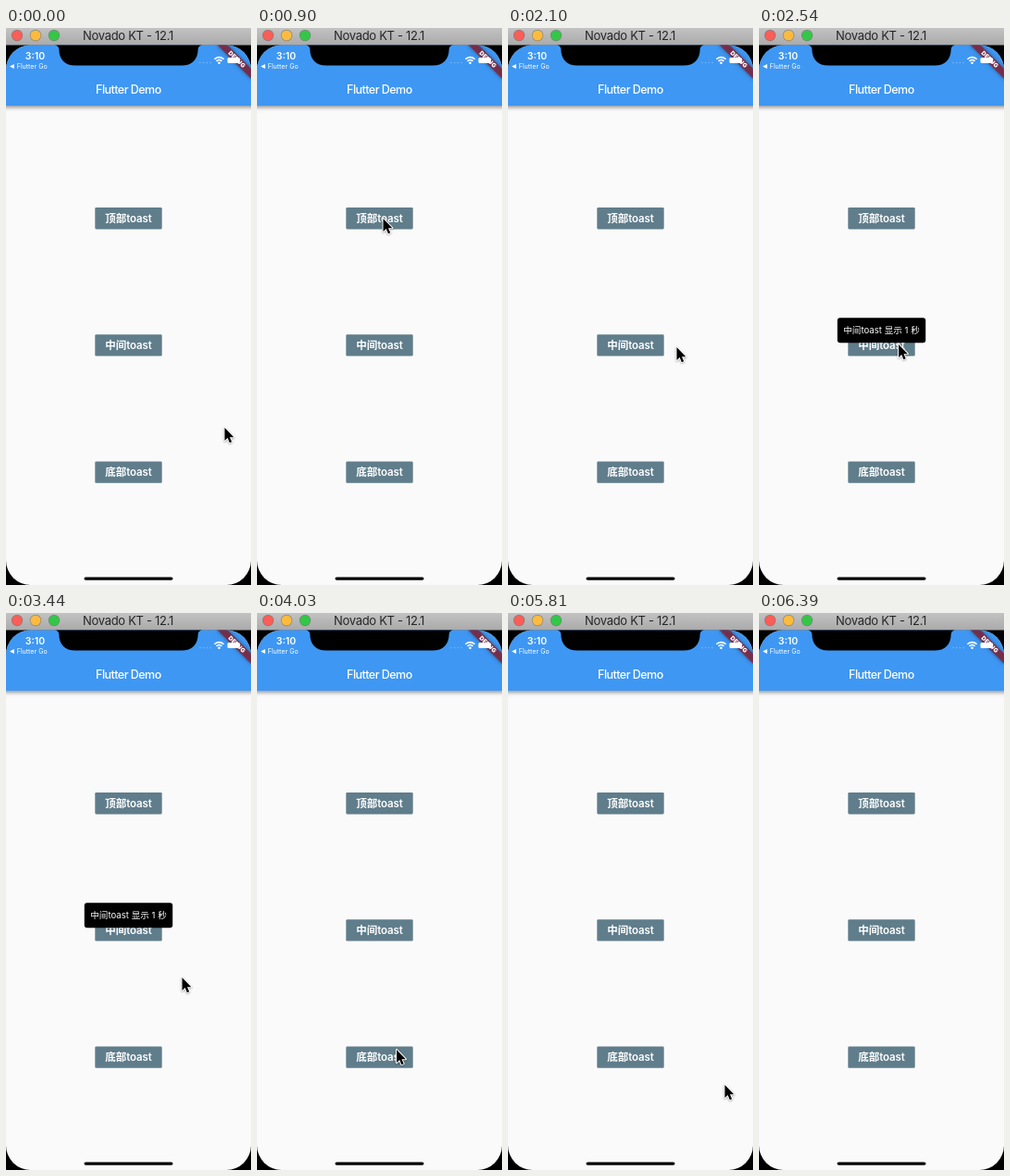
Animation, 265 px wide and 602 px high, one loop 6.49 s. Source, as an HTML page with a canvas:

```html
<!DOCTYPE html>
<html lang="zh-CN">
<head>
<meta charset="utf-8">
<title>Toast demo</title>
<style>
  html, body { margin: 0; width: 100%; height: 100%; overflow: hidden; background: #000; }
  canvas { display: block; width: 265px; height: 602px; }
</style>
</head>
<body>
<canvas id="stage"></canvas>
<script>
const W = 265, H = 602, MID = 132.5;
const LOOP = 6490, STEP = 148.6;
const FONT = 'Inter, "Noto Sans CJK SC", "Noto Sans CJK JP", "Noto Sans CJK", sans-serif';
const BLUE = '#3e97f3';
const canvas = document.getElementById('stage');
const ctx = canvas.getContext('2d');
const dpr = window.devicePixelRatio || 1;
canvas.width = W * dpr;
canvas.height = H * dpr;

const ITEMS = [
  { name: '顶部toast', secs: 0.5, at: 1130, toastY: 167.3 },
  { name: '中间toast', secs: 1, at: 2510, toastY: 313.2 },
  { name: '底部toast', secs: 1.5, at: 4250, toastY: 459 }
];

// Pointer: rest position, then eased moves between two steps
const REST = { x: 236.5, y: 432 };
const MOVES = [
  { from: 2, to: 6, x: 136.5, y: 206 },
  { from: 7, to: 9, x: 242.5, y: 380 },
  { from: 12, to: 14, x: 182.5, y: 345 },
  { from: 14, to: 16, x: 151, y: 342 },
  { from: 17, to: 19, x: 199, y: 379 },
  { from: 22, to: 23, x: 190.5, y: 394 },
  { from: 23, to: 25, x: 151, y: 472 },
  { from: 28, to: 30, x: 234.5, y: 510 },
  { from: 40, to: 43, x: 256, y: 620 }
];

const ease = p => p * p * (3 - 2 * p);

function pointerAt(step) {
  let { x, y } = REST;
  for (const m of MOVES) {
    const p = Math.min(1, Math.max(0, (step - m.from) / (m.to - m.from)));
    x += (m.x - x) * ease(p);
    y += (m.y - y) * ease(p);
  }
  return { x, y };
}

function box(x, y, w, h, r, fill) {
  ctx.fillStyle = fill;
  ctx.beginPath();
  ctx.roundRect(x, y, w, h, r);
  ctx.fill();
}

function dot(x, y, r, fill) {
  ctx.fillStyle = fill;
  ctx.beginPath();
  ctx.arc(x, y, r, 0, Math.PI * 2);
  ctx.fill();
}

function setFont(size, weight = 400, gap = 0) {
  ctx.font = `${weight} ${size}px ${FONT}`;
  ctx.letterSpacing = gap + 'px';
}

function text(str, x, y, size, { weight, fill = '#fff', align = 'center', gap } = {}) {
  setFont(size, weight, gap);
  ctx.textAlign = align;
  ctx.fillStyle = fill;
  ctx.fillText(str, x, y);
}

function shadow(color, blur, dy) {
  ctx.shadowColor = color;
  ctx.shadowBlur = blur * dpr;
  ctx.shadowOffsetY = dy * dpr;
}

function drawTitleBar() {
  const g = ctx.createLinearGradient(0, 0, 0, 18.5);
  g.addColorStop(0, '#c2c2c2');
  g.addColorStop(1, '#aaa');
  ctx.fillStyle = g;
  ctx.fillRect(0, 0, W, 18.5);
  ['#fb5d57', '#fcbb3f', '#33c748'].forEach((c, i) => {
    dot(12 + i * 20, 8, 6.2, 'rgba(0,0,0,.3)');
    dot(12 + i * 20, 8, 5.6, c);
  });
  text('Novado KT - 12.1', 132, 12.7, 13, { fill: '#262626', gap: -0.3 });
}

function drawNotch() {
  ctx.fillStyle = '#000';
  ctx.beginPath();
  ctx.moveTo(53, 18.5);
  ctx.quadraticCurveTo(57, 19, 57.3, 23);
  ctx.bezierCurveTo(57.5, 34, 64, 40.6, 75, 40.6);
  ctx.lineTo(190, 40.6);
  ctx.bezierCurveTo(201, 40.6, 207.5, 34, 207.7, 23);
  ctx.quadraticCurveTo(208, 19, 212, 18.5);
  ctx.fill();
}

function drawStatus() {
  text('3:10', 31.5, 34, 10.5, { weight: 600 });
  ctx.beginPath();
  ctx.moveTo(4, 41.5);
  ctx.lineTo(8.8, 39);
  ctx.lineTo(8.8, 44);
  ctx.fill();
  text('Flutter Go', 11.7, 44, 7.1, { align: 'left' });

  for (let i = 0; i < 4; i++) dot(210 + i * 3.7, 37.5, 0.8, 'rgba(255,255,255,.3)');

  ctx.strokeStyle = '#fff';
  ctx.lineWidth = 1.6;
  for (const r of [4, 7]) {
    ctx.beginPath();
    ctx.arc(230.5, 38.6, r, -Math.PI * 0.76, -Math.PI * 0.24);
    ctx.stroke();
  }
  dot(230.5, 37.8, 1.3, '#fff');
}

function inCorner(draw) {
  ctx.save();
  ctx.translate(W, 18.5);
  ctx.rotate(Math.PI / 4);
  draw();
  ctx.restore();
}

function drawBanner() {
  inCorner(() => {
    shadow('rgba(0,0,0,.5)', 4, 0);
    ctx.fillStyle = 'rgba(130,38,62,.85)';
    ctx.fillRect(-26, 17.9, 52, 7.7);
  });
  box(239.5, 32, 13.5, 6, 1.5, '#fff');
  inCorner(() => text('DEBUG', 0, 23.9, 6.5, { weight: 900 }));
}

function drawScreen() {
  ctx.save();
  ctx.beginPath();
  ctx.roundRect(0, 18.5, W, H - 18.5, 26.6);
  ctx.clip();
  ctx.fillStyle = '#fafafa';
  ctx.fillRect(0, 18, W, H);

  ctx.save();
  shadow('rgba(0,0,0,.4)', 4, 1.8);
  ctx.fillStyle = BLUE;
  ctx.fillRect(-10, 10, W + 20, 74);
  ctx.restore();

  drawStatus();
  drawBanner();
  text('Flutter Demo', 132.4, 70.5, 12.5, { weight: 500, gap: -0.52 });

  ITEMS.forEach(({ name }, i) => {
    const y = 194 + i * 137.2;
    box(MID - 36.2, y, 72.4, 23.4, 1.3, '#607d8b');
    text(name, MID, y + 16, 11.5, { weight: 600, gap: -0.1 });
  });
  box(84.5, 593.5, 96, 3.2, 1.6, '#000');
  ctx.restore();
  drawNotch();
}

function drawToast({ name, secs, toastY }) {
  const label = `${name} 显示 ${secs} 秒`;
  setFont(9.6);
  const w = ctx.measureText(label).width + 13;
  box(MID - w / 2, toastY, w, 27, 3, '#000');
  text(label, MID, toastY + 17.2, 9.6);
}

function drawPointer({ x, y }) {
  ctx.save();
  ctx.translate(x, y);
  ctx.beginPath();
  [[0, 0], [0, 14], [3.2, 11.1], [5.4, 16.2], [7.7, 15.2], [5.5, 10.3], [9.9, 10.3]]
    .forEach(([px, py]) => ctx.lineTo(px, py));
  ctx.closePath();
  ctx.lineJoin = 'round';
  ctx.lineWidth = 2;
  ctx.strokeStyle = '#fff';
  shadow('rgba(0,0,0,.35)', 2, 0.7);
  ctx.stroke();
  ctx.shadowColor = 'transparent';
  ctx.fillStyle = '#000';
  ctx.fill();
  ctx.restore();
}

function render(time) {
  const step = Math.floor(time / STEP);
  const t = step * STEP;
  ctx.setTransform(dpr, 0, 0, dpr, 0, 0);
  ctx.fillStyle = '#000';
  ctx.fillRect(0, 0, W, H);
  drawTitleBar();
  drawScreen();
  ITEMS.filter(({ at, secs }) => t >= at && t < at + secs * 1000).forEach(drawToast);
  drawPointer(pointerAt(step));
}

const start = performance.now();
function tick() {
  render((performance.now() - start) % LOOP);
  requestAnimationFrame(tick);
}
tick();
</script>
</body>
</html>
```
